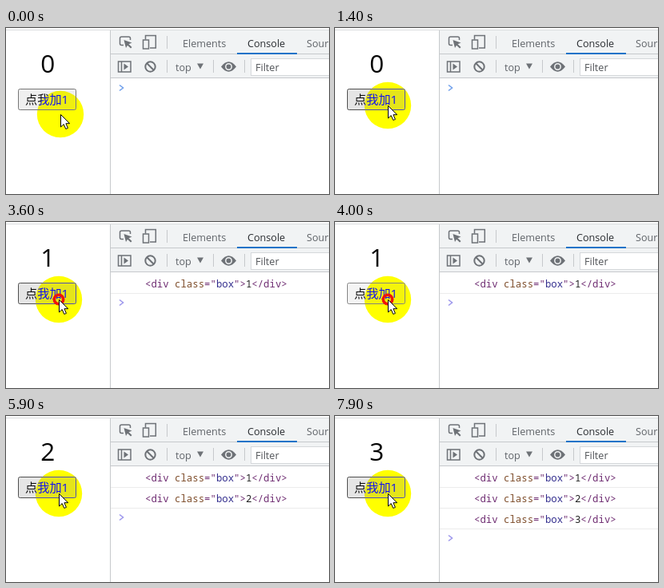
Animation, 404 px wide and 208 px high, one loop 8000 ms. Source, as an HTML page:

```html
<!DOCTYPE html>
<html lang="zh">
<head>
<meta charset="utf-8">
<title>Counter and console</title>
<style>
html, body { margin: 0; width: 100%; height: 100%; overflow: hidden; background: #fff; }
svg { display: block; }
text { font: 12.6px "Open Sans", "Noto Sans", sans-serif; fill: #5f6368; white-space: pre; }
.count { font-size: 31.5px; fill: #000; text-anchor: middle; }
.label { font: 15.2px "Open Sans", "Noto Sans CJK SC", "Noto Sans CJK", sans-serif; fill: #111; }
.log text { font: 12.35px "Noto Sans Mono", "DejaVu Sans Mono", monospace; fill: #6f2d72; }
.log .attr { fill: #80502e; }
.log .val { fill: #35308f; }
.log .num { fill: #222; }
.icon { fill: none; stroke: #6e7277; stroke-width: 1.5; }
.icon .solid { fill: #6e7277; stroke: none; }
.rule { stroke: #c6c9cc; }
.glow { mix-blend-mode: difference; }
</style>
</head>
<body>
<svg width="404" height="208" viewBox="0 0 404 208">
  <rect width="404" height="208" fill="#fff"/>
  <path class="rule" d="M0 2.5H404" style="stroke:#dadcde"/>

  <text id="count" class="count" x="52.3" y="56">0</text>
  <rect id="button" x="15.5" y="76.5" width="72" height="26" rx="2"/>
  <text class="label" x="24" y="95">点我加1</text>

  <rect x="131" y="3" width="273" height="59" fill="#f1f3f4"/>
  <path class="rule" d="M130.5 3V208M131 32.5H404M131 62.5H404"/>
  <path class="rule" d="M201.5 10V26M201.5 40V56M259.5 40V56M298.5 40V56"/>

  <g class="icon">
    <path d="M147 21.5H144.500Q142.500 21.500 142.500 19.500V13Q142.500 11 144.500 11H153.500Q155.500 11 155.500 13V15"/>
    <path class="solid" d="M147.500 15L157.500 18.500L153.500 20.200L157.500 24L156 25.500L152 21.700L150 25Z"/>
    <path d="M174.500 14.500V9.500H187.300V25H180"/>
    <rect x="171.500" y="15" width="7" height="11"/>
    <rect x="140.500" y="42" width="15.500" height="13"/>
    <path d="M144.500 42V55"/>
    <path class="solid" d="M147.500 44.500V52.500L153 48.500Z"/>
    <circle cx="180.500" cy="48.500" r="6.200" stroke-width="2"/>
    <path d="M176.300 44.300L184.700 52.700" stroke-width="2"/>
    <path class="solid" d="M269 48.500Q278.500 36 288 48.500Q278.500 61 269 48.500Z"/>
    <circle cx="278.500" cy="48.500" r="3.700" fill="#6e7277" stroke="#f1f3f4"/>
    <path class="solid" d="M239 44.500H247L243 51.500Z"/>
  </g>

  <text x="221" y="24">Elements</text>
  <text x="302" y="24" style="fill:#2b2e32">Console</text>
  <text x="376" y="24">Sources</text>
  <rect x="289" y="31" width="75" height="2" fill="#1a73c8"/>
  <text x="212" y="54">top</text>
  <rect x="306.500" y="38.500" width="110" height="21" fill="#fff" stroke="#d5d8db"/>
  <text x="312" y="54.300" style="fill:#505357">Filter</text>

  <g id="logs"></g>
  <path id="prompt" d="M142 71.500L146.500 75L142 78.500" fill="none" stroke-width="1.500"/>

  <g id="pointer" class="glow"><circle r="29.200" fill="#00f"/></g>
  <g id="mouse">
    <circle id="ring" r="5.700" fill="none" stroke="#f01408" stroke-width="3.600"/>
    <path d="M.5 .5V16L4.200 12.600L6.800 18.500L9.400 17.400L6.900 11.700H11.600Z" fill="#fff" stroke="#000"/>
  </g>
</svg>
<script>
const LOOP = 8000, ROW = 26;
const $ = id => document.getElementById(id);

// [start ms, value]
const tracks = {
  count: [[0, 0], [2500, 1], [5700, 2], [7900, 3]],
  pressed: [[0, false], [2400, true], [2500, false], [3600, true], [5700, false], [7800, true], [7900, false]],
  button: [[0, "idle"], [300, "hover"], [3700, "active"], [5700, "hover"]],
  move: [[0, 0], [100, .25], [200, .5], [300, .75], [400, 1]]
};
const skins = {
  idle: ["#efefef", "#767676"],
  hover: ["#e5e5e5", "#4f4f4f"],
  active: ["#f4f4f4", "#858585"]
};

const at = (track, t) => track.reduce((v, [start, next]) => t >= start ? next : v, track[0][1]);
const show = (el, on) => el.setAttribute("visibility", on ? "visible" : "hidden");

const logRow = n => {
  const y = (n - 1) * ROW;
  return `<g class="log"><text x="174" y="${82.4 + y}">&lt;div <tspan class="attr">class</tspan>="<tspan class="val">box</tspan>"&gt;<tspan class="num">${n}</tspan>&lt;/div&gt;</text>` +
    `<path d="M131 ${89.5 + y}H404" stroke="#ececec"/></g>`;
};
$("logs").innerHTML = [1, 2, 3].map(logRow).join("");
const rows = [...$("logs").children];

function draw(t) {
  const count = at(tracks.count, t);
  $("count").textContent = count;
  rows.forEach((row, i) => show(row, i < count));
  $("prompt").setAttribute("transform", `translate(0 ${count * ROW})`);
  $("prompt").setAttribute("stroke", count ? "#9a94ec" : "#6d9eeb");

  const [fill, edge] = skins[at(tracks.button, t)];
  $("button").setAttribute("fill", fill);
  $("button").setAttribute("stroke", edge);

  const m = at(tracks.move, t);
  const place = `translate(${68 - 2 * m} ${108 - 11 * m})`;
  $("pointer").setAttribute("transform", place);
  $("mouse").setAttribute("transform", place);
  show($("ring"), at(tracks.pressed, t));
}

const begin = performance.now();
function tick(now) {
  draw(Math.max(0, now - begin) % LOOP);
  requestAnimationFrame(tick);
}
draw(0);
requestAnimationFrame(tick);
</script>
</body>
</html>
```
